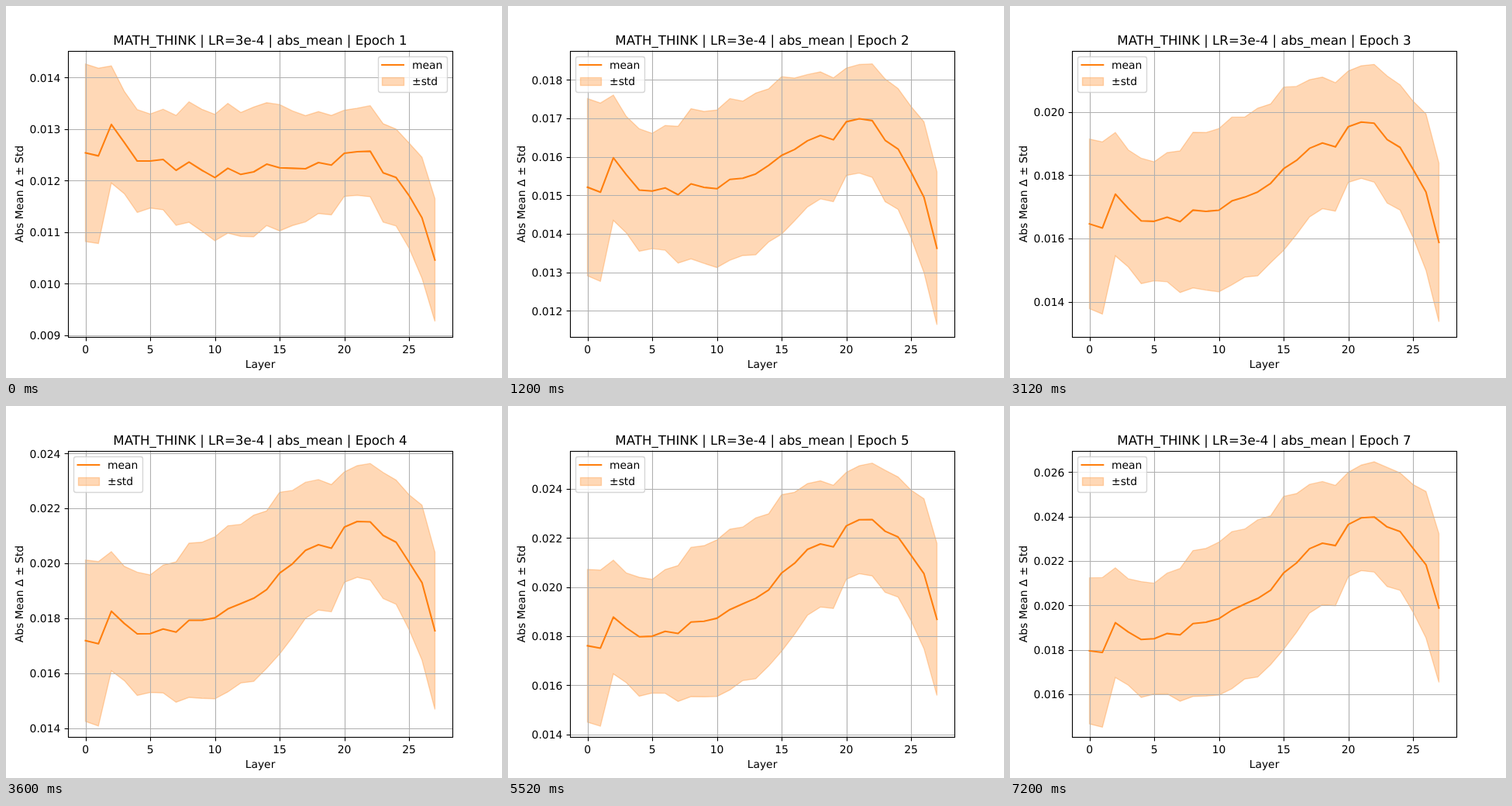
Recreate the animation shown at these times as an HTML page. Size 640 px wide and 480 px high, loop 8 s.

```html
<!DOCTYPE html>
<html lang="en">
<head>
<meta charset="utf-8">
<title>Abs mean per layer</title>
<style>
  html, body { margin: 0; width: 100%; height: 100%; overflow: hidden; background: #fff; }
  svg { display: block; width: 640px; height: 480px; }
  text { font: 13.889px "DejaVu Sans", sans-serif; fill: #000; text-rendering: geometricPrecision; }
  .title { font-size: 16.667px; }
  .mid { text-anchor: middle; }
  .end { text-anchor: end; }
  .band { fill: #ff7f0e; fill-opacity: .3; stroke: #ff7f0e; stroke-opacity: .3; stroke-width: 1.389; }
  .mean { fill: none; stroke: #ff7f0e; stroke-width: 2.083; stroke-linecap: square; stroke-linejoin: round; }
  .grid { stroke: #b0b0b0; stroke-width: 1.111; }
  .axis { fill: none; stroke: #000; stroke-width: 1.111; }
  .box { fill: #fff; fill-opacity: .8; stroke: #ccc; stroke-opacity: .8; stroke-width: 1.389; }
</style>
</head>
<body>
<svg id="plot" viewBox="0 0 640 480"></svg>
<script>
const EPOCH_MS = 1200, LOOP_MS = 8000;
const LEFT = 80, RIGHT = 576, TOP = 57.6, BOTTOM = 427.2;

// Per layer, in units of 1e-5: first mean, its total growth, typical spread.
const START = [1254, 1248, 1309, 1274, 1238, 1238, 1241, 1220, 1236, 1220, 1206, 1224, 1212, 1217,
  1232, 1225, 1224, 1223, 1235, 1230, 1253, 1256, 1257, 1215, 1206, 1171, 1128, 1046];
const GROWTH = [541, 540, 613, 606, 608, 612, 632, 647, 682, 704, 734, 754, 794, 814,
  836, 921, 967, 1032, 1045, 1039, 1111, 1138, 1141, 1138, 1126, 1086, 1055, 942];
const SPREAD = [268, 272, 195, 185, 198, 188, 204, 224, 246, 249, 258, 265, 253, 265,
  251, 258, 234, 217, 208, 203, 176, 178, 186, 201, 198, 215, 247, 251];

// rest: share of growth still to come; lag: how much later the deep layers grow;
// wide: spread factor; axis: highest tick, its y, tick step, pixels per step.
const EPOCHS = [
  { rest: 1, lag: 0, wide: .475, axis: [1400, 92.3, 100, 66.5] },
  { rest: .585, lag: .079, wide: .793, axis: [1800, 95.4, 100, 49.65] },
  { rest: .35, lag: .075, wide: 1, axis: [2000, 136.7, 200, 81.65] },
  { rest: .195, lag: .053, wide: 1.142, axis: [2400, 61.3, 200, 70.85] },
  { rest: .095, lag: .032, wide: 1.235, axis: [2400, 106.8, 200, 63.4] },
  { rest: .034, lag: .0115, wide: 1.3, axis: [2600, 71.3, 200, 59.4] },
  { rest: 0, lag: 0, wide: 1.335, axis: [2600, 85.3, 200, 57.3] }
];

const snap = v => Math.floor(v + .5) + .5;
const layerX = i => LEFT + 22.545 + i * 450.909 / 27;
const line = (x1, y1, x2, y2, cls) =>
  `<path class="${cls}" d="M${x1} ${y1}L${x2} ${y2}"/>`;
const rect = (x1, y1, x2, y2, cls, r = 0) =>
  `<rect class="${cls}" x="${x1}" y="${y1}" width="${x2 - x1}" height="${y2 - y1}" rx="${r}"/>`;
const text = (x, y, str, cls = "", extra = "") =>
  `<text x="${x}" y="${y}" class="${cls}" ${extra}>${str}</text>`;

function meanAt(i, { rest, lag }) {
  const x = i / 13.5 - 1;
  const left = rest + lag * (.4 * x + .6 * x ** 3);
  return START[i] + GROWTH[i] * (1 - left);
}

// The first layers widen less than the others.
const stdAt = (i, { wide }) =>
  SPREAD[i] * (1 + (wide - 1) * (1 - .32 * Math.exp(-i * i / 9)));

function legend(x) {
  const labelX = Math.floor(x + 44.5);
  return rect(snap(x), 65.5, snap(x + 89.4), 111.5, "box", 2.78) +
    line(x + 5.56, 76, x + 33.33, 76, "mean") +
    rect(snap(x + 5.56), 92.5, snap(x + 33.33), 102.5, "band") +
    text(labelX, 81, "mean") + text(labelX, 102, "±std");
}

function chart(epoch, n) {
  const [topTick, topY, step, gap] = epoch.axis;
  const mean = START.map((_, i) => meanAt(i, epoch));
  const std = START.map((_, i) => stdAt(i, epoch));
  const point = (v, i) =>
    layerX(i).toFixed(2) + "," + (topY + (topTick - v) * gap / step).toFixed(2);
  const upper = mean.map((m, i) => point(m + std[i], i));
  const lower = mean.map((m, i) => point(m - std[i], i)).reverse();

  let grid = "", ticks = "", labels = "";
  for (let i = 0; i <= 25; i += 5) {
    const x = snap(layerX(i));
    grid += line(x, TOP, x, BOTTOM, "grid");
    ticks += line(x, 427.5, x, 432.4, "axis");
    labels += text(layerX(i), 448, i, "mid");
  }
  for (let v = topTick, y = topY; y < BOTTOM; v -= step, y += gap) {
    grid += line(LEFT, snap(y), RIGHT, snap(y), "grid");
    ticks += line(75.6, snap(y), 80.5, snap(y), "axis");
    labels += text(70.3, Math.round(y + 5.3), (v / 1e5).toFixed(3), "end");
  }

  return `<polygon class="band" points="${upper.concat(lower).join(" ")}"/>
    ${grid}${ticks}
    <polyline class="mean" points="${mean.map(point).join(" ")}"/>
    ${rect(80.5, 58.5, 576.5, 427.5, "axis")}
    ${labels}${legend(n ? 86.95 : 479.6)}
    ${text(328, 50, `MATH_THINK | LR=3e-4 | abs_mean | Epoch ${n + 1}`, "title mid")}
    ${text(328, 467, "Layer", "mid")}
    ${text(0, 0, "Abs Mean Δ ± Std", "mid", 'transform="translate(22 242.6) rotate(-90)"')}`;
}

const plot = document.getElementById("plot");
const charts = EPOCHS.map(chart);
let shown = -1;

function tick() {
  const n = Math.floor(performance.now() % LOOP_MS / EPOCH_MS);
  if (n !== shown) plot.innerHTML = charts[shown = n];
  requestAnimationFrame(tick);
}
tick();
</script>
</body>
</html>
```
